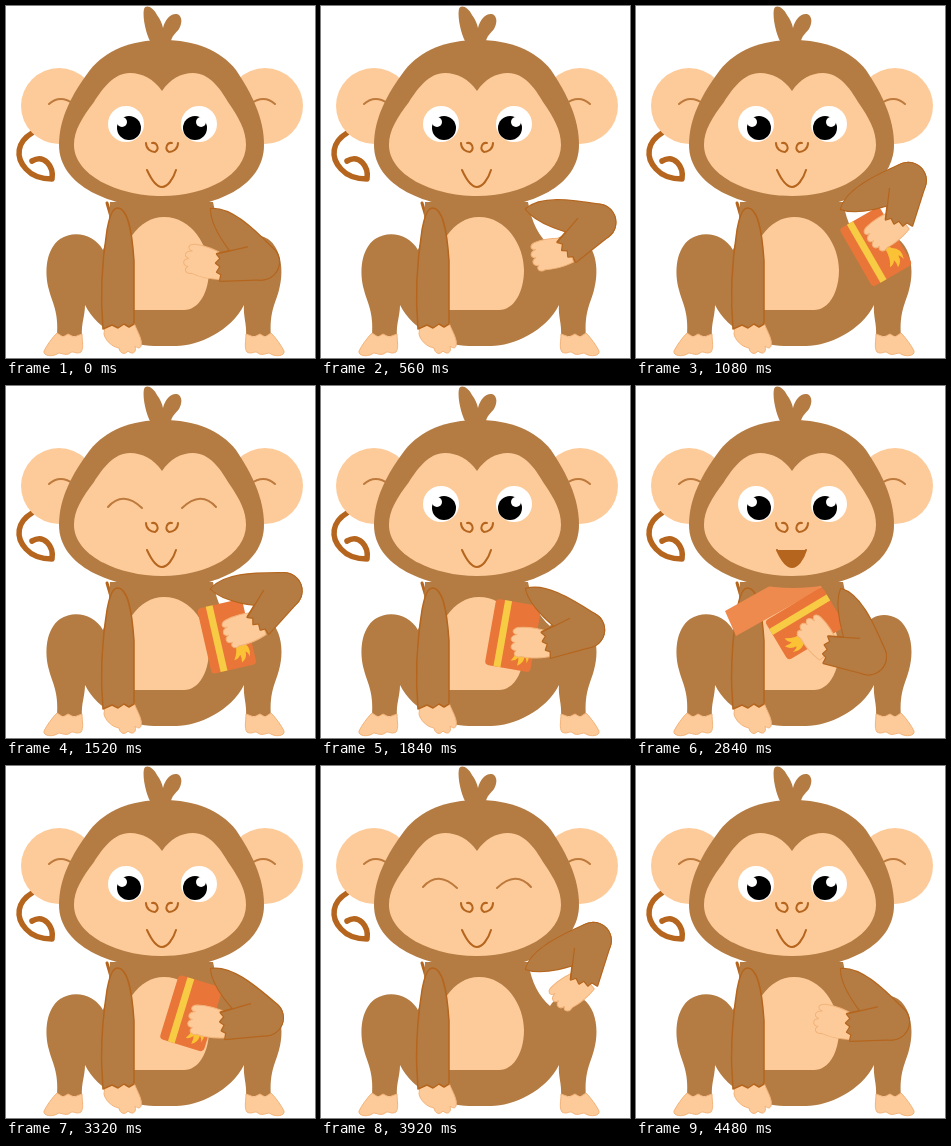
Recreate the animation shown at these times as an HTML page. Size 309 by 352 pixels, loop 4.52 s.

```html
<!DOCTYPE html>
<html lang="en">
<head>
<meta charset="utf-8">
<title>Monkey</title>
<style>
  html, body { margin: 0; width: 100%; height: 100%; overflow: hidden; background: #fff; }
  svg { display: block; width: 100%; height: 100%; }
  .fur { fill: #b47c43; }
  .skin { fill: #fdcb9a; }
  .edge { stroke: #b5651d; stroke-width: 1.5; stroke-linejoin: round; }
  .paw { stroke: #f2b37a; stroke-width: 1; stroke-linejoin: round; }
  .line { fill: none; stroke: #b5651d; stroke-width: 2; stroke-linecap: round; }
  .soft { stroke: #bd7a3c; }
  .rim { stroke: #b5651d; stroke-width: 2.4; stroke-linejoin: round; }
</style>
</head>
<body>
<svg viewBox="0 0 309 352">
  <defs>
    <path id="upperShape" d="M0 0C12 -15 40 -17 73 -17.5A17.5 17.5 0 0 1 73 17.5C42 15 14 13 0 0Z"/>
    <path id="foreShape" d="M0 -17.5L-43 -13L-40 -8L-45 -4L-41 0L-45 5L-41 8L-43 14L0 17.5A17.5 17.5 0 0 0 0 -17.5Z"/>
  </defs>

  <path class="line" stroke-linejoin="round" style="stroke-width:5.5" d="M26 127C11 136 9 151 20 163C28 172 38 173 46 173C48 160 38 148 26 155"/>

  <path class="line" style="stroke-width:3" d="M101 197L106 214"/>
  <path class="fur" d="M104 196C103 215 103 230 97 244C88 228 68 224 54 233C40 243 38 266 43 284C46 296 53 306 51 330H76C75 318 79 310 79 299C92 325 125 340 148 340H170C192 340 225 325 238 299C237 310 241 318 240 330H265C263 306 270 296 273 284C278 266 276 243 262 233C250 226 236 228 229 240C218 230 211 218 207 196Z"/>
  <path class="skin" d="M158 211C186 211 203 240 203 264C203 286 193 304 178 304H128C116 300 113 282 114 266C115 240 132 211 158 211Z"/>
  <g id="foot">
    <path class="skin paw" d="M51 327L57 331L62 328L68 331L76 328C76 335 78 342 75 346C70 349 67 344 64 347C59 351 54 345 51 348C46 351 37 350 38 345C41 339 46 332 51 327Z"/>
  </g>
  <use href="#foot" transform="translate(316 0) scale(-1 1)"/>
  <path class="skin paw" d="M99 319L128 317C131 325 137 334 135 340C134 343 131 342 129 340C131 347 126 349 122 345C119 349 114 348 113 342C106 341 99 334 98 328Z"/>
  <path class="fur edge" d="M97 323C94 290 95 262 101 224C104 208 107 202 112 202C122 203 126 225 128 255V318L123 321L118 318L112 322L106 319Z"/>

  <path id="flap" fill="#ee8a4e" d="M89 225L100 250L186 202L175 177Z"/>

  <g id="ear">
    <circle class="skin" cx="53" cy="100" r="38"/>
    <path class="line soft" d="M43 98Q54 88 68 98"/>
  </g>
  <use href="#ear" transform="translate(312 0) scale(-1 1)"/>
  <path class="fur" d="M146 38C141 32 136 12 138 3C140 -2 147 1 151 9C154 13 156 17 157 22C159 13 165 7 171 8C177 10 176 18 173 23C170 27 166 29 164 38Z"/>
  <path class="fur" d="M157 34C125 34 100 44 84 64C66 88 53 112 53 139C53 180 105 202 157 202C210 202 258 180 258 139C258 112 246 88 230 64C214 44 189 34 157 34Z"/>
  <path class="skin" d="M156 85C148 73 136 67 124 67C108 67 97 82 88 96C76 112 68 124 68 139C68 168 110 190 156 190C202 190 240 168 240 139C240 124 233 112 222 96C214 82 203 67 187 67C175 67 164 73 156 85Z"/>
  <path class="line" d="M140 137C140 143 145 146 149 146C154 143 151 136 146 137M172 137C172 143 167 146 163 146C158 143 161 136 166 137"/>
  <path id="mouth" class="line" d="M141 164C146 175 151 181 156 181C161 181 167 174 170 164"/>
  <g id="open">
    <g fill="#fff"><circle cx="120" cy="118" r="18"/><circle cx="193" cy="118" r="18"/></g>
    <circle cx="123" cy="122" r="12"/><circle cx="189" cy="122" r="12"/>
    <g fill="#fff"><circle cx="116" cy="116" r="5"/><circle cx="195" cy="116" r="5"/></g>
  </g>
  <path id="closed" class="line soft" d="M102 121Q117 104 136 122M176 122Q195 104 210 121"/>

  <g id="book">
    <rect x="-23" y="-33.5" width="46" height="67" rx="4" fill="#e97638"/>
    <rect x="-14" y="-33.5" width="7" height="67" fill="#f8cb45"/>
    <path fill="#fbc236" d="M7 8Q11 5 13 9Q22 14 18 25Q17 20 15 19Q15 26 9 29Q10 24 9 21Q6 25 2 25Q7 18 7 8Z"/>
  </g>
  <g id="hand"><path class="skin paw" d="M5 -12C-6 -16 -18 -18 -28 -17C-34 -16 -35 -11 -29 -10C-36 -9 -37 -3 -31 -2C-37 0 -36 6 -30 6C-34 9 -31 14 -25 12C-16 14 -6 14 4 12Z"/></g>
  <g class="rim">
    <use class="upper" href="#upperShape"/>
    <use class="fore" href="#foreShape"/>
  </g>
  <g class="fur">
    <use class="upper" href="#upperShape"/>
    <use class="fore" href="#foreShape"/>
  </g>
  <path class="fore line" style="stroke-width:1.2" d="M-12 -16.500L-42 -13.200"/>
</svg>
<script>
const LOOP = 4520, STEP = 40;
const SHOULDER = [205, 203], UPPER = 73, FORE = 43;
const byId = id => document.getElementById(id);
const [hand, book, flap, mouth, openEyes, closedEyes] =
  ['hand', 'book', 'flap', 'mouth', 'open', 'closed'].map(byId);
const uppers = document.querySelectorAll('.upper');
const fores = document.querySelectorAll('.fore');

// Angles of upper arm, forearm and hand, then the book's shift in the hand
const belly = [46.5, -6.5, 12, 5], hip = [-23, -77, -40, 4];
const carry = [34, -20, 0, -9], present = [68, 10, 49, -1], lower = [42, -10, 7, -8];
const keys = [
  [0, belly], [1080, hip], [1280, hip], [1840, carry], [2240, present], [3160, present],
  [3320, lower], [3720, hip], [4280, hip], [4480, belly], [LOOP, belly]
];

function poseAt(t) {
  const i = keys.findIndex(key => key[0] > t);
  const [t0, a] = keys[i - 1], [t1, b] = keys[i];
  const p = (t - t0) / (t1 - t0);
  return a.map((v, k) => v + (b[k] - v) * p);
}

const during = (t, from, to) => t >= from && t < to;
const clamp = v => Math.max(0, Math.min(1, v));
const setVisible = (node, on) => node.setAttribute('visibility', on ? 'visible' : 'hidden');
const polar = ([x, y], length, degrees) => {
  const a = degrees * Math.PI / 180;
  return [x + length * Math.cos(a), y + length * Math.sin(a)];
};
const place = (node, point, angle, extra = '') =>
  node.setAttribute('transform', `translate(${point}) rotate(${angle}) ${extra}`);

function draw(t) {
  const [upperTurn, foreTurn, handTurn, shift] = poseAt(t);
  const elbow = polar(SHOULDER, UPPER, upperTurn);
  const wrist = polar(elbow, FORE, foreTurn + 180);
  uppers.forEach(node => place(node, SHOULDER, upperTurn));
  fores.forEach(node => place(node, elbow, foreTurn));
  place(hand, wrist, handTurn);
  place(book, wrist, handTurn, `translate(-33 ${shift}) rotate(10)`);
  book.setAttribute('opacity', Math.min(clamp((t - 1000) / 80), clamp((3920 - t) / 80)));

  const slide = t < 3040 ? clamp((t - 2320) / 240) : 0.3;
  flap.setAttribute('transform', `translate(${21 * (1 - slide)} ${-12 * (1 - slide)})`);
  setVisible(flap, during(t, 2360, 3080));

  mouth.style.fill = during(t, 2840, 3040) ? '#b5651d' : 'none';
  const blink = during(t, 1320, 1560) || during(t, 3920, 4160);
  setVisible(openEyes, !blink);
  setVisible(closedEyes, blink);
}

const start = performance.now();
function tick() {
  const t = (performance.now() - start) % LOOP;
  draw(Math.floor(t / STEP) * STEP);
  requestAnimationFrame(tick);
}
tick();
</script>
</body>
</html>
```
